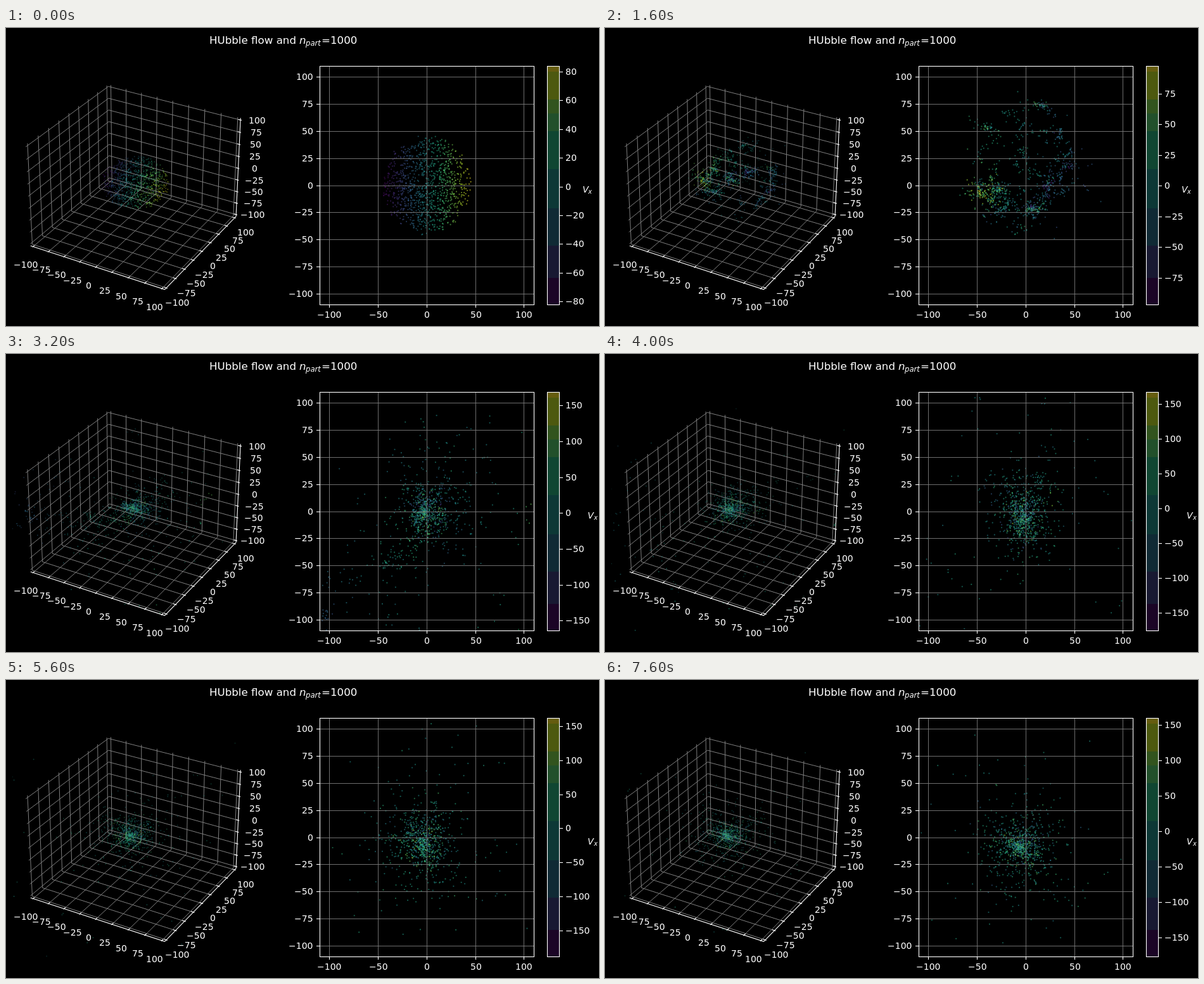
These frames come from a looping animation (936 px wide and 471 px high, 8 s). An HTML page with a canvas:

```html
<!DOCTYPE html>
<html lang="en">
<head>
<meta charset="utf-8">
<title>Hubble flow</title>
<style>
html, body { margin: 0; width: 100%; height: 100%; overflow: hidden; background: #000; }
canvas { display: block; width: 936px; height: 471px; }
</style>
</head>
<body>
<canvas id="stage" width="936" height="471"></canvas>
<script>
const ctx = document.getElementById('stage').getContext('2d');
const STEP = 400, COUNT = 20, N = 1000;
const TICKS = [-100, -75, -50, -25, 0, 25, 50, 75, 100];
const FONT = '"DejaVu Sans", sans-serif';

// ---------- particles: cold expanding ball under its own gravity ----------
const GM = 362, SOFT2 = 2.5, SUB = 24, DT = 0.58 / SUB, HUBBLE = 1.82;
const CLUMPS = [
  [-25, 48, 8], [-38, -36, 16], [-12, -63, -9], [12, 28, 10], [38, 18, 30], [8, -32, 13],
  [50, 25, -10], [17, -22, -30], [-62, -8, 0], [46, 2, 20]
];
const DRIFT = [-0.3, -0.5, 0];

let seed = 20417;
function rand() {
  seed = (seed + 0x6D2B79F5) | 0;
  let t = Math.imul(seed ^ (seed >>> 15), 1 | seed);
  t = (t + Math.imul(t ^ (t >>> 7), 61 | t)) ^ t;
  return ((t ^ (t >>> 14)) >>> 0) / 4294967296;
}

const arrays = () => [0, 1, 2].map(() => new Float64Array(N));
const pos = arrays(), vel = arrays(), acc = arrays();

function init() {
  for (let i = 0; i < N; i++) {
    const r = 46 * Math.cbrt(rand()), c = 2 * rand() - 1, a = 2 * Math.PI * rand();
    const s = Math.sqrt(1 - c * c);
    const p = [r * s * Math.cos(a), r * s * Math.sin(a), r * c];
    const v = p.map(q => q * HUBBLE);
    for (const clump of CLUMPS) {
      const d = clump.map((q, k) => q / 1.75 - p[k]);
      const pull = 0.25 * Math.exp(-(d[0] * d[0] + d[1] * d[1] + d[2] * d[2]) / 162);
      d.forEach((q, k) => v[k] += q * pull);
    }
    p.forEach((q, k) => { pos[k][i] = q; vel[k][i] = v[k]; });
  }
}

function gravity() {
  const [x, y, z] = pos, [ax, ay, az] = acc;
  acc.forEach(a => a.fill(0));
  for (let i = 0; i < N; i++) {
    const xi = x[i], yi = y[i], zi = z[i];
    let sx = 0, sy = 0, sz = 0;
    for (let j = i + 1; j < N; j++) {
      const dx = x[j] - xi, dy = y[j] - yi, dz = z[j] - zi;
      const d2 = dx * dx + dy * dy + dz * dz + SOFT2;
      const f = GM / (d2 * Math.sqrt(d2));
      sx += f * dx; sy += f * dy; sz += f * dz;
      ax[j] -= f * dx; ay[j] -= f * dy; az[j] -= f * dz;
    }
    ax[i] += sx; ay[i] += sy; az[i] += sz;
  }
}

function kick(h) {
  for (let k = 0; k < 3; k++)
    for (let i = 0; i < N; i++) vel[k][i] += acc[k][i] * h;
}

function advance() {
  gravity();
  for (let s = 0; s < SUB; s++) {
    kick(DT / 2);
    for (let k = 0; k < 3; k++)
      for (let i = 0; i < N; i++) pos[k][i] += vel[k][i] * DT;
    gravity();
    kick(DT / 2);
  }
}

// each state is centred on its median, which drifts slowly
const states = [];
function snapshot() {
  const n = states.length;
  const [x, y, z] = pos.map((p, k) => {
    const shift = DRIFT[k] * n - (n ? p.slice().sort()[N / 2] : 0);
    return p.map(q => q + shift);
  });
  states.push({ x, y, z, vx: vel[0].slice() });
}
function stateAt(n) {
  while (states.length <= n) { advance(); snapshot(); }
  return states[n];
}

// ---------- colour ----------
const VIRIDIS = [
  [68, 1, 84], [71, 45, 123], [59, 82, 139], [44, 114, 142], [33, 145, 140],
  [40, 174, 128], [94, 201, 98], [173, 220, 48], [253, 231, 37]
];
function viridis(t) {
  const f = Math.min(1, Math.max(0, t)) * 8, i = Math.min(7, Math.floor(f));
  return VIRIDIS[i].map((a, k) => Math.round(a + (VIRIDIS[i + 1][k] - a) * (f - i)));
}

// state, lowest and highest velocity on the colour bar
const RANGES = [
  [0, -82.2, 84], [1, -62, 62], [2, -60.6, 51.9], [4, -96.9, 97.7], [8, -163.7, 168.9],
  [12, -187.5, 165.4], [16, -188.6, 158.3], [19, -176.8, 159.8]
];
function rangeAt(n) {
  const k = RANGES.findIndex(r => r[0] >= n);
  if (k === 0) return RANGES[0].slice(1);
  const a = RANGES[k - 1], b = RANGES[k], f = (n - a[0]) / (b[0] - a[0]);
  return [a[1] + (b[1] - a[1]) * f, a[2] + (b[2] - a[2]) * f];
}

// ---------- drawing helpers ----------
function line(points, color, width) {
  ctx.strokeStyle = color;
  ctx.lineWidth = width;
  ctx.beginPath();
  points.forEach(p => ctx.lineTo(p[0], p[1]));
  ctx.stroke();
}
// anchor: 0 left, 0.5 centre, 1 right; whole-pixel origin; returns the right end
function text(s, x, y, anchor = 0, size = 14, style = '') {
  ctx.font = `${style} ${size}px ${FONT}`;
  ctx.fillStyle = '#fff';
  const w = ctx.measureText(s).width;
  ctx.fillText(s, Math.round(x - w * anchor), Math.round(y));
  return x + w * (1 - anchor);
}
const label = v => (v < 0 ? '−' : '') + Math.abs(v);
function dot(x, y, r, rgb, alpha) {
  ctx.fillStyle = `rgba(${rgb},${alpha})`;
  ctx.beginPath();
  ctx.arc(x, y, r, 0, 7);
  ctx.fill();
}
function clipped(x, y, w, h, draw) {
  ctx.save();
  ctx.beginPath();
  ctx.rect(x, y, w, h);
  ctx.clip();
  draw();
  ctx.restore();
}

// ---------- 3D view: elevation 30, azimuth -60 ----------
const EDGE = 104.17;
function project(x, y, z) {
  x *= 0.005714; y *= 0.005714; z *= 0.004286;
  const depth = 10 - (0.433 * x - 0.75 * y + 0.5 * z);
  return [
    203.9 + 2038 * (0.866 * x + 0.5 * y) / depth,
    243.5 - 2038 * (-0.25 * x + 0.433 * y + 0.866 * z) / depth,
    depth
  ];
}
const path3 = (pts, color, width) => line(pts.map(p => project(...p)), color, width);

function drawBox() {
  const e = EDGE, grey = '#7e7e7e';
  for (const t of TICKS) {
    path3([[t, -e, -e], [t, e, -e], [t, e, e]], grey, 1);
    path3([[e, t, -e], [-e, t, -e], [-e, t, e]], grey, 1);
    path3([[e, e, t], [-e, e, t], [-e, -e, t]], grey, 1);
  }
}

function drawAxes3() {
  const e = EDGE, a = e - 3.5, b = e + 1.8;
  path3([[-e, -e, -e], [e, -e, -e], [e, e, -e], [e, e, e]], '#fff', 1.1);
  for (const t of TICKS) {
    path3([[t, -a, -e], [t, -b, -e]], '#fff', 1.1);
    path3([[a, t, -e], [b, t, -e]], '#fff', 1.1);
    path3([[a, e, t], [b, e, t]], '#fff', 1.1);
    const put = (p, dx, dy) => text(label(t), p[0] + dx, p[1] + dy + 5, 0.5);
    put(project(t, -e, -e), -11.5, 29);
    put(project(e, t, -e), 17.5, 23.2);
    put(project(e, e, t), 26, 0.5);
  }
}

function drawCloud(s, tint) {
  const pts = Array.from(s.x, (x, i) => project(x, s.y[i], s.z[i]));
  const order = pts.map((p, i) => i).sort((i, j) => pts[j][2] - pts[i][2]);
  const far = pts[order[0]][2], near = pts[order[N - 1]][2];
  clipped(10, 56, 379, 386, () => {
    for (const i of order) {
      const [x, y, d] = pts[i];
      dot(x, y, 0.95, tint[i], 0.2 + 0.35 * (far - d) / (far - near));
    }
  });
}

// ---------- flat view ----------
const L = 495, T = 60, W = 338, H = 377;
const px = v => 663.8 + v * W / 220, py = v => 248.5 - v * H / 220;
const snap = v => Math.round(v) + 0.5;

function drawFlat(s, tint) {
  clipped(L, T, W, H, () => {
    for (let i = 0; i < N; i++) dot(px(s.x[i]), py(s.y[i]), 1.12, tint[i], 0.56);
  });
  for (const t of [-100, -50, 0, 50, 100]) {
    const x = snap(px(t));
    line([[x, T], [x, T + H]], '#7a7a7a', 0.9);
    line([[x, T + H], [x, T + H + 5]], '#fff', 1.1);
    text(label(t), x, 458, 0.5);
  }
  for (const t of TICKS) {
    const y = snap(py(t));
    line([[L, y], [L + W, y]], '#7a7a7a', 0.9);
    line([[L - 5, y], [L, y]], '#fff', 1.1);
    text(label(t), 484.5, y + 4.5, 1);
  }
  ctx.lineWidth = 1.1;
  ctx.strokeStyle = '#fff';
  ctx.strokeRect(L + 0.5, T + 0.5, W, H);
}

// ---------- colour bar ----------
const BANDS = [
  [60, '#655c0f'], [69, '#4d590f'], [113, '#32541e'], [135, '#22502b'], [163, '#104632'],
  [223, '#0d3836'], [285, '#102a35'], [344, '#181932'], [395, '#1b0526'], [437, '']
];
function drawBar(lo, hi) {
  for (let i = 0; i < BANDS.length - 1; i++) {
    ctx.fillStyle = BANDS[i][1];
    ctx.fillRect(854, BANDS[i][0], 20, BANDS[i + 1][0] - BANDS[i][0]);
  }
  ctx.lineWidth = 1.1;
  ctx.strokeStyle = '#fff';
  ctx.strokeRect(854.5, T + 0.5, 19, H);
  const span = hi - lo, step = [20, 25, 50].find(q => span / q <= 9);
  for (let v = Math.ceil(lo / step) * step; v <= hi; v += step) {
    const y = snap(T + H * (hi - v) / span);
    line([[874, y], [879, y]], '#fff', 1.1);
    text(label(v), 883, y + 4.5);
  }
  const x = text('V', lo <= -100 ? 918 : 909.5, 260, 0, 14, 'italic');
  text('x', x, 262, 0, 9.8, 'italic');
}

function drawTitle() {
  let x = text('HUbble flow and ', 320.5, 25, 0, 16.67);
  x = text('n', x, 25, 0, 16.67, 'italic');
  x = text('part', x, 28, 0, 11.67, 'italic');
  text('=1000', x + 0.5, 25, 0, 16.67);
}

function draw(n) {
  const s = stateAt(n), [lo, hi] = rangeAt(n);
  const tint = Array.from(s.vx, v => viridis((v - lo) / (hi - lo)));
  ctx.fillStyle = '#000';
  ctx.fillRect(0, 0, 936, 471);
  drawTitle();
  drawBox();
  drawCloud(s, tint);
  drawAxes3();
  drawFlat(s, tint);
  drawBar(lo, hi);
}

init();
snapshot();
draw(0);
let shown = 0;
const start = performance.now();
function tick() {
  const n = Math.floor((performance.now() - start) / STEP) % COUNT;
  if (n !== shown) draw(shown = n);
  requestAnimationFrame(tick);
}
requestAnimationFrame(tick);
</script>
</body>
</html>
```
